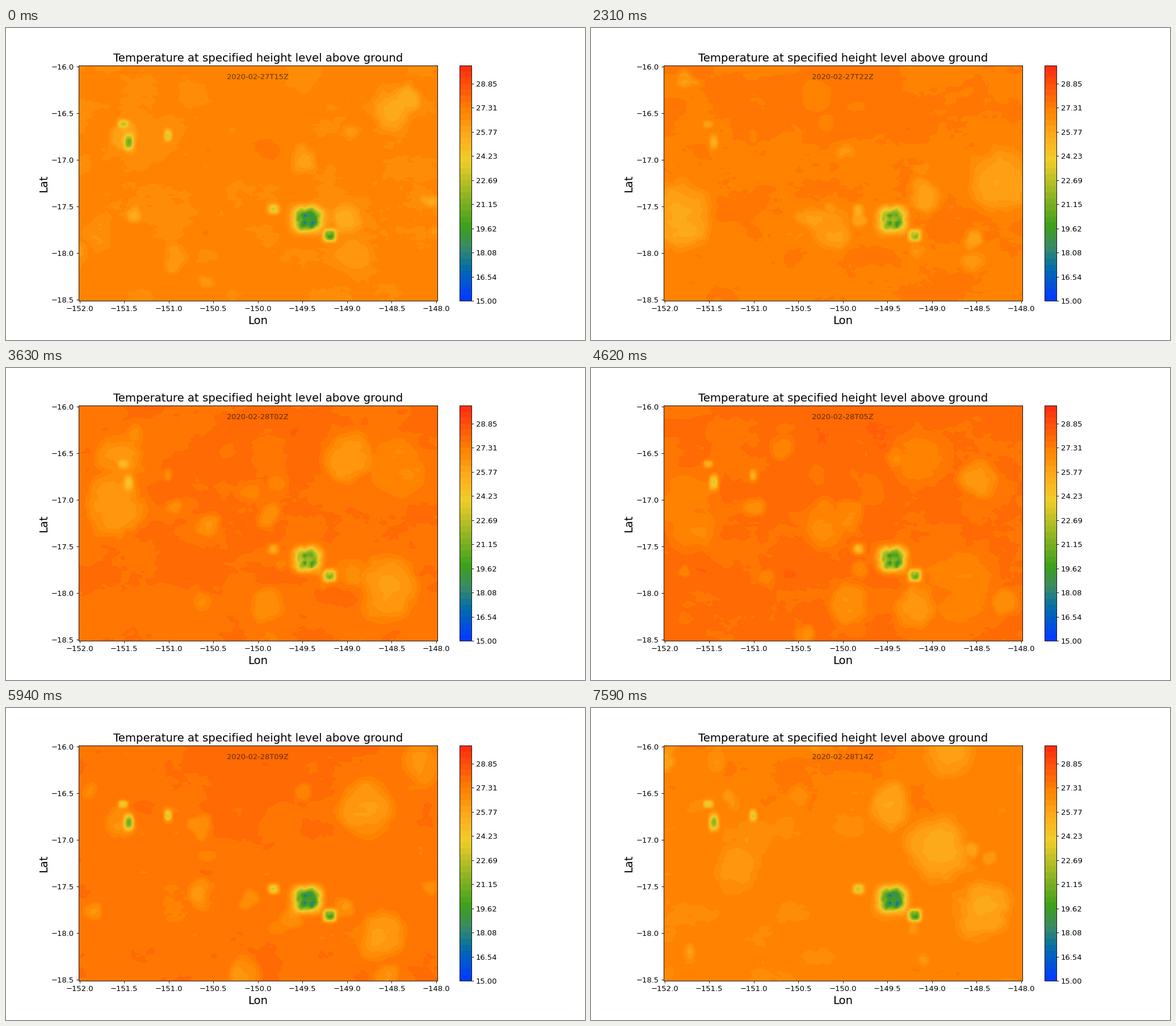
Animation, 1020 px wide and 549 px high, one loop 7.92 s. Source, as a matplotlib script:

```python
import numpy as np
import matplotlib.pyplot as plt
from matplotlib.animation import FuncAnimation
from matplotlib.colors import LinearSegmentedColormap, ListedColormap

W, H, DPI = 1020, 549, 80
LEFT, RIGHT, TOP, BOTTOM = 127.6, 759.9, 65.9, 480.4
T_MIN, T_MAX, BANDS = 15, 30, 39
HOURS, STEP = 24, .025

plt.rcParams.update({"font.family": "DejaVu Sans",
                     "xtick.labelsize": 11.8, "ytick.labelsize": 11.8})

# name: lon, lat, radius east, radius north, cooling by day and by night
ISLANDS = {
    "main": (-149.45, -17.64, .145, .125, 6.8, 9.4),
    "peninsula": (-149.20, -17.81, .070, .062, 5.0, 7.4),
    "triangle": (-149.83, -17.53, .060, .050, 1.8, 4.2),
    "west": (-151.45, -16.82, .048, .085, 1.6, 5.4),
    "north-west": (-151.51, -16.62, .050, .038, 1.5, 4.0),
    "middle": (-151.01, -16.74, .038, .060, .4, 4.0),
}

# Broad squalls: hour at full strength, lon, lat, radius
SQUALLS = [
    (0, -149.01, -17.63, .18), (0, -148.37, -16.35, .16),
    (3, -151.93, -17.79, .21), (3, -148.06, -17.44, .18),
    (7, -151.82, -17.60, .36), (7, -148.25, -17.20, .36),
    (7, -149.09, -17.39, .18), (11, -151.60, -17.05, .33),
    (11, -149.00, -16.54, .27), (11, -148.55, -17.95, .33),
    (14, -148.50, -16.74, .20), (18, -148.81, -16.68, .29),
    (18, -148.62, -18.02, .25), (23, -149.48, -16.65, .23),
    (23, -148.95, -17.10, .34), (23, -148.45, -17.75, .30),
]

lon = np.arange(-152, -147.99, STEP)
lat = np.arange(-16, -18.51, -STEP)
LON, LAT = np.meshgrid(lon, lat)


def noise(size_x, size_y, seed):
    """Smooth random field whose grain is given in grid cells."""
    u, v = np.arange(lon.size) / size_x, np.arange(lat.size) / size_y
    i, j = u.astype(int), v.astype(int)
    grid = np.random.default_rng(seed).standard_normal((j[-1] + 2, i[-1] + 2))
    fu, fv = ((t * t * (3 - 2 * t)) for t in (u - i, v - j))
    rows = grid[:, i] * (1 - fu) + grid[:, i + 1] * fu
    return rows[j] * (1 - fv[:, None]) + rows[j + 1] * fv[:, None]


# Bent coordinates give the rain cells ragged outlines.
BENT_LON = LON + .03 * noise(8, 8, 1) + .012 * noise(3, 3, 2)
BENT_LAT = LAT + .03 * noise(8, 8, 3) + .012 * noise(3, 3, 4)
SWELL = noise(14, 9, 5), noise(14, 9, 6)
RELIEF = noise(1.6, 1.6, 7)
RIDGE = np.exp(-((LON + 149.95) / .8) ** 2 - ((LAT + 16.35) / .6) ** 2)


def daily(hour, peak):
    return np.cos(2 * np.pi * (hour - peak) / HOURS)


def rain_cells(count=5, seed=21):
    """Small showers born at a steady rate, as (birth, life, lon, lat, radius, depth)."""
    rng = np.random.default_rng(seed)
    cells = []
    for birth in range(-5, HOURS):
        for _ in range(count):
            x, y = rng.uniform(-152, -148), rng.uniform(-18.5, -16)
            radius = min(.07 * np.exp(abs(rng.normal(0, .7))), .25)
            depth = rng.uniform(.6, 1.6)
            # Showers are weak under the warm ridge.
            depth *= 1 - .7 * np.exp(-((x + 149.95) / .8) ** 2
                                     - ((y + 16.35) / .6) ** 2)
            cells.append((birth, rng.uniform(3, 6), x, y, radius, depth))
    return cells


SHOWERS = rain_cells()


def plateau(x, y, radius):
    """Cool pool with a fairly sharp rim and a colder heart."""
    q = ((BENT_LON - x) ** 2 + (BENT_LAT - y) ** 2) / radius ** 2
    q = np.minimum(q, 8)
    return .65 * np.exp(-q ** 3) + .35 * np.exp(-1.6 * q)


def rain_cooling(hour):
    cooling = np.zeros_like(LON)
    for birth, life, x, y, radius, depth in SHOWERS:
        age = (hour - birth) / life
        if 0 < age < 1:
            pool = plateau(x - .1 * age, y, radius * (.8 + .5 * age))
            cooling = np.maximum(cooling, depth * np.sin(np.pi * age) ** .6 * pool)
    for peak, x, y, radius in SQUALLS:
        age = (hour - peak) / 4
        if abs(age) < 1:
            pool = plateau(x - .2 * age, y, radius * (1 + .2 * age))
            cooling = np.maximum(cooling, 1.5 * (1 - age ** 2) * pool)
    return cooling


def island_cooling(hour):
    night = .5 + .5 * daily(hour, 20)
    relief = 1 + (.2 - .06 * night) * RELIEF
    cooling = np.zeros_like(LON)
    for x, y, rx, ry, by_day, by_night in ISLANDS.values():
        q = np.abs((LON - x) / rx) ** 3 + np.abs((LAT - y) / ry) ** 3
        depth = by_day + (by_night - by_day) * night
        cooling = np.maximum(cooling, depth * np.exp(-q) * relief)
    return cooling


def temperature(hour):
    turn = 3 * np.pi * hour / HOURS
    field = 27.35 + .38 * daily(hour, 14)
    field = field + (.3 + .15 * daily(hour, 15)) * RIDGE
    field += .13 * (np.cos(turn) * SWELL[0] + np.sin(turn) * SWELL[1])
    field += .05 * noise(4, 2.5, 100 + hour) + .03 * noise(1.5, 1, 200 + hour)
    field -= rain_cooling(hour) + island_cooling(hour)
    return np.clip(field, T_MIN, T_MAX)


def stamp(hour):
    h = 15 + hour
    return f"2020-02-{27 + h // 24}T{h % 24:02d}Z"


ramp = LinearSegmentedColormap.from_list("heat", [
    (0, "#003cff"), (.12, "#006ab0"), (.17, "#187a8c"), (.22, "#3c8a66"),
    (.31, "#3ca01c"), (.6, "#f0cd28"), (.72, "#ffa719"), (.82, "#ff8200"),
    (1, "#ff3010")])
colors = ListedColormap(ramp(np.linspace(0, 1, BANDS)))


def add_axes(x0, x1):
    return fig.add_axes([x0 / W, 1 - BOTTOM / H, (x1 - x0) / W, (BOTTOM - TOP) / H])


def put_text(x, y, text, size=17.8, **style):
    return fig.text(x / W, 1 - y / H, text, size=size, ha="center", **style)


fig = plt.figure(figsize=(W / DPI, H / DPI), dpi=DPI, facecolor="white")
ax = add_axes(LEFT, RIGHT)
half = STEP / 2
image = ax.imshow(temperature(0), cmap=colors, vmin=T_MIN, vmax=T_MAX,
                  extent=(-152 - half, -148 + half, -18.5 - half, -16 + half),
                  aspect="auto", interpolation="bilinear")
ax.set_xticks(np.arange(-152, -147.9, .5))
ax.set_yticks(np.arange(-18.5, -15.9, .5))

bar = fig.colorbar(image, cax=add_axes(799.4, 820.1), format="%.2f",
                   ticks=np.linspace(T_MIN, T_MAX, BANDS + 1)[::4])
bar.ax.minorticks_off()

put_text(443.7, 59.2, "Temperature at specified height level above ground")
put_text(443.3, 521, "Lon")
put_text(66.2, 274, "Lat", rotation=90, va="center")
label = put_text(443.3, 90, stamp(0), 11.7, alpha=.6)


def update(hour):
    image.set_data(temperature(hour))
    label.set_text(stamp(hour))
    return image, label


anim = FuncAnimation(fig, update, frames=HOURS, interval=330,
                     repeat=True, repeat_delay=0)
plt.show()
```
